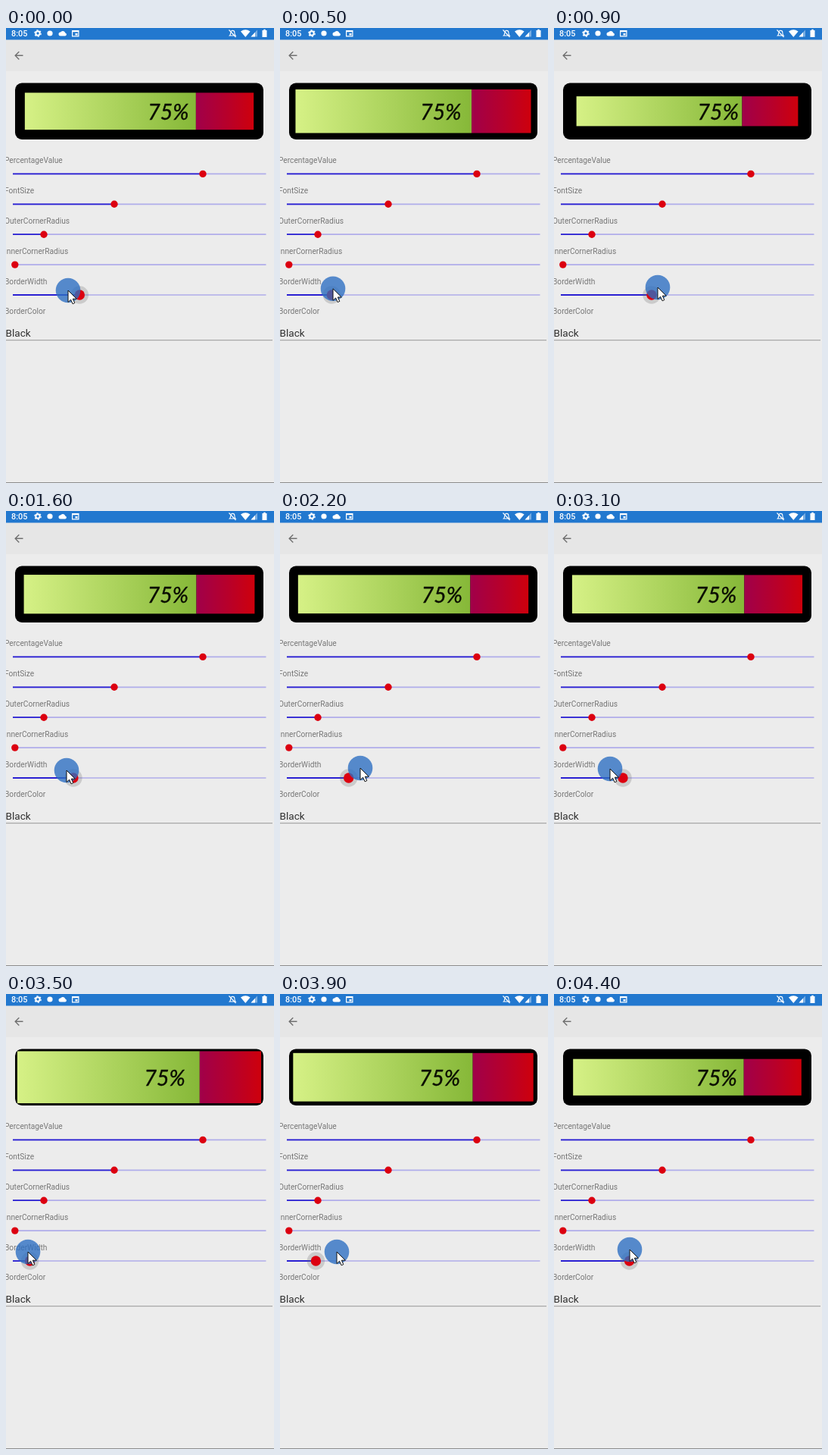
An HTML page for the animation above (4500 ms loop, 354 px wide and 600 px high).

```html
<!DOCTYPE html>
<html lang="en">
<head>
<meta charset="utf-8">
<title>Progress bar border width</title>
<style>
  html, body { margin: 0; width: 100%; height: 100%; overflow: hidden; background: #ececec; }
  svg { display: block; width: 100%; height: 100%; }
  text { font-family: Roboto, sans-serif; }
  .label { font-size: 10.2px; fill: #777; }
  .percent { font: italic 28.5px Lato, sans-serif; fill: #0b0e02; stroke: #0b0e02; stroke-width: .4; text-anchor: end; }
  .track { stroke: #b0adea; stroke-width: 1.7; }
  .active { stroke: #2a20d2; stroke-width: 1.8; }
  .knob { fill: #dc0010; }
</style>
</head>
<body>
<svg viewBox="0 0 354 600">
  <defs>
    <linearGradient id="green"><stop stop-color="#d6f186"/><stop offset="1" stop-color="#86b838"/></linearGradient>
    <linearGradient id="red"><stop stop-color="#a0004a"/><stop offset=".55" stop-color="#b8002a"/><stop offset="1" stop-color="#ce000c"/></linearGradient>
  </defs>
  <rect width="354" height="600" fill="#ececec"/>
  <rect y="15" width="354" height="42" fill="#e6e6e6"/>
  <rect width="354" height="15.5" fill="#2278cf"/>
  <rect y="599" width="354" height="1" fill="#8c8c8c"/>

  <!-- status bar -->
  <g fill="#fff">
    <text x="7" y="11" font-size="10.9" font-weight="500">8:05</text>
    <circle cx="42" cy="7" r="2.7" fill="none" stroke="#fff" stroke-width="2"/>
    <circle cx="42" cy="7" r="4.2" fill="none" stroke="#fff" stroke-width="1.3" stroke-dasharray="2.2 2.2"/>
    <circle cx="58" cy="7" r="3.6"/>
    <path d="M72 10.5a2.5 2.5 0 0 1 0-5a3.5 3.5 0 0 1 6.3.9a2.1 2.1 0 0 1 0 4.1z"/>
    <path d="M87 3h9.500v8.500h-9.500zM88.200 5.300v5h7.100v-5zM91.500 7h3v2.500h-3z" fill-rule="evenodd"/>
    <path d="M295.500 10c1.300-1 1-2.500 1.200-4a2.600 2.600 0 0 1 5.200 0c.2 1.500-.1 3 1.200 4zM294.500 2.500l9 9.500" fill="none" stroke="#fff" stroke-width="1.1"/>
    <path d="M310 4.500q6.300-4.500 12.600 0l-6.300 7.500z"/>
    <path d="M323.500 11.500h8.500v-9z" opacity=".4"/>
    <path d="M323.500 11.500h5.500v-5.800z"/>
    <path d="M338.500 3h1.800v-1.200h2.400v1.200h1.800v9h-6z"/>
  </g>
  <path d="M22.500 36.300h-10M17.300 31.200l-5.100 5.100l5.100 5.100" fill="none" stroke="#707070" stroke-width="1.4"/>

  <!-- progress bar -->
  <rect x="12" y="72.500" width="328" height="74.500" rx="9"/>
  <rect id="done" fill="url(#green)"/>
  <rect id="rest" fill="url(#red)"/>
  <text id="percent" class="percent" y="120.500">75%</text>

  <g id="sliders"></g>
  <text class="label" x="-2" y="377.300">BorderColor</text>
  <text x="-.5" y="406.700" font-size="13.6" fill="#303030">Black</text>
  <path d="M0 411.700h352" stroke="#a8a8a8" stroke-width="1.3"/>

  <!-- dragged slider -->
  <path id="filled" class="active"/>
  <g id="thumb">
    <circle r="11.700" fill="#666" opacity=".25"/>
    <circle r="6.700" class="knob"/>
  </g>
  <g id="pointer">
    <circle r="16.300" fill="#2d6fc3" opacity=".79"/>
    <path d="M0 0v15.500l3.600-3.300l2.500 5.600l2.700-1.200l-2.500-5.400h5z" fill="#fff" stroke="#111" stroke-width="1"/>
  </g>
</svg>
<script>
const STEP = 100;
// pointer x for every step, and [step, y] stops for its slow vertical drift
const pointerX = [
  82, 72, 68, 67, 68, 70, 82, 106, 127.5,
  137, 143, 146, 143, 132, 112, 90.5, 80, 72,
  72, 72, 76, 88, 106, 124, 138, 147, 148,
  143, 131, 114, 94, 74, 55, 41, 32, 29,
  29, 31, 42.5, 75, 92, 98, 100, 99.5, 100];
const driftY = [[0, 346], [9, 342], [16, 342], [26, 337], [31, 340], [39, 340], [44, 337]];
const sliders = [
  ["PercentageValue", 260], ["FontSize", 143], ["OuterCornerRadius", 50],
  ["InnerCornerRadius", 11.8], ["BorderWidth", null]];

const byId = id => document.getElementById(id);
const set = (id, attrs) => {
  for (const key in attrs) byId(id).setAttribute(key, attrs[key]);
};
const lerp = (a, b, t) => a + (b - a) * t;

byId("sliders").innerHTML = sliders.map(([name, x], i) => {
  const y = 192.4 + i * 39.9;
  const value = x === null ? "" :
    `<path class="active" d="M9 ${y}H${x}"/><circle class="knob" cx="${x}" cy="${y}" r="4.7"/>`;
  return `<text class="label" x="-2" y="${y - 14.4}">${name}</text>
    <path class="track" d="M9 ${y}H343.5"/>${value}`;
}).join("");

function pointerY(step) {
  const i = Math.max(1, driftY.findIndex(([s]) => s >= step));
  const [s0, y0] = driftY[i - 1], [s1, y1] = driftY[i];
  return lerp(y0, y1, (step - s0) / (s1 - s0));
}

function draw(step) {
  const count = pointerX.length;
  const x = pointerX[step];
  // the thumb trails the pointer by almost one step
  const thumb = lerp(pointerX[(step + count - 1) % count], x, 0.15);
  const border = (thumb - 12) / 6.64;
  const left = 12 + border, top = 72.5 + border;
  const width = 328 - 2 * border, height = 74.5 - 2 * border;
  const split = left + width * 0.75 - 0.7;

  set("done", { x: left, y: top, width: split - left, height });
  set("rest", { x: split, y: top, width: left + width - split, height });
  set("percent", { x: 235.4 + 0.48 * border });
  set("filled", { d: `M9 352H${thumb}` });
  set("thumb", { transform: `translate(${thumb} 352)` });
  set("pointer", { transform: `translate(${x} ${pointerY(step)})` });
}

const start = performance.now();
function tick(now) {
  draw(Math.floor(Math.max(0, now - start) / STEP) % pointerX.length);
  requestAnimationFrame(tick);
}
draw(0);
requestAnimationFrame(tick);
</script>
</body>
</html>
```
